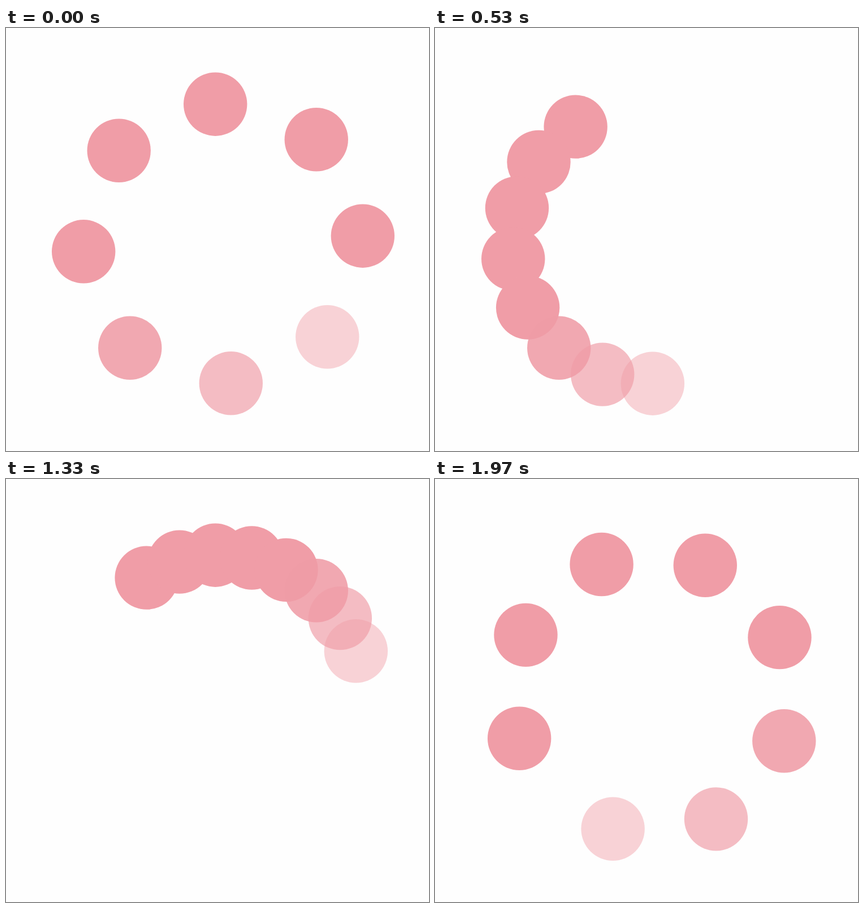
Animation, 748 px wide and 748 px high, one loop 2 s. Source, as an HTML page:

```html
<!DOCTYPE html>
<html lang="en">
<head>
<meta charset="utf-8">
<title>Loader</title>
<style>
  html, body { margin: 0; width: 100%; height: 100%; overflow: hidden; background: #fefefe; }
  svg { display: block; width: 100%; height: 100%; }
</style>
</head>
<body>
<svg viewBox="0 0 748 748"><g id="ring" fill="#f09da7"></g></svg>
<script>
const LOOP = 2000;
const CENTER = { x: 384, y: 381.5 };
const ORBIT = 247.2;
const OPACITY = [1, 1, 1, 1, 1, 0.88, 0.67, 0.46];

const ring = document.getElementById('ring');
const dots = OPACITY.map(opacity => {
  const dot = document.createElementNS('http://www.w3.org/2000/svg', 'circle');
  dot.setAttribute('r', 56.2);
  dot.setAttribute('fill-opacity', opacity);
  return ring.appendChild(dot);
});

// 30 steps per second, with step times rounded to 10 ms (0, 30, 70, 100, ...)
function stepAt(time) {
  const rest = time % 100;
  return Math.floor(time / 100) * 3 + (rest >= 30) + (rest >= 70);
}

// Angles run clockwise from the top; the gap between dots closes, then reverses.
function draw(time) {
  const step = stepAt(time % LOOP);
  const lead = 86.8 + 15 * step;
  const gap = 45 - 1.5 * step;
  dots.forEach((dot, i) => {
    const angle = (lead - i * gap) * Math.PI / 180;
    dot.setAttribute('cx', CENTER.x + ORBIT * Math.sin(angle));
    dot.setAttribute('cy', CENTER.y - ORBIT * Math.cos(angle));
  });
}

const start = performance.now();
function tick() {
  draw(performance.now() - start);
  requestAnimationFrame(tick);
}
tick();
</script>
</body>
</html>
```
